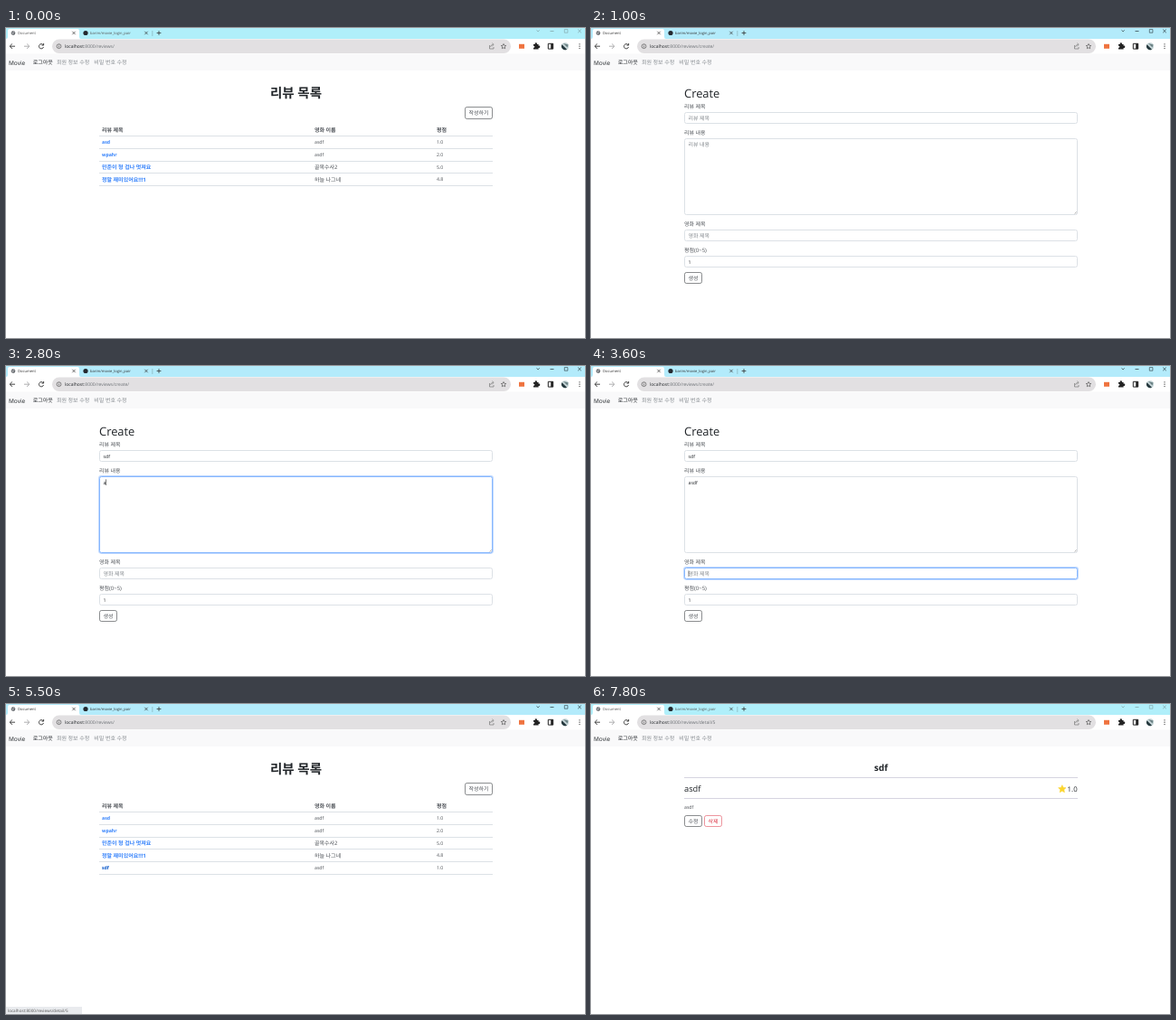
These frames come from a looping animation (640 px wide and 343 px high, 8200 ms). An HTML page:

```html
<!DOCTYPE html>
<html lang="ko">
<head>
<meta charset="utf-8">
<title>Movie reviews</title>
<style>
  html, body { margin: 0; height: 100%; overflow: hidden; background: #fff; }
  svg { display: block; width: 100vw; height: 100vh; }
  text {
    font-family: "Open Sans", "Noto Sans CJK KR", "Noto Sans CJK", sans-serif;
    text-rendering: geometricPrecision;
    white-space: pre;
  }
</style>
</head>
<body>
<svg id="stage" viewBox="0 0 640 343"></svg>
<script>
const LOOP = 8200, STEP = 100;
const INK = '#212529', SOFT = '#4c5056', MUTED = '#858a8f', LINE = '#dce1e6', BLUE = '#0d6efd', RED = '#dc3545';
const stage = document.getElementById('stage');

// Drawing helpers: each returns SVG markup. Text is placed by its vertical centre.
const text = (x, cy, str, { fill = INK, size = /[ㄱ-힣]/.test(str) ? 6 : 5.2, bold, anchor = 'start' } = {}) =>
  `<text x="${x}" y="${cy + size * .36}" font-size="${size}" fill="${fill}" text-anchor="${anchor}"` +
  `${bold ? ' font-weight="700"' : ''}>${str}</text>`;
const rect = (x, y, w, h, fill, attrs = '') =>
  `<rect x="${x}" y="${y}" width="${w}" height="${h}" fill="${fill}" ${attrs}/>`;
const path = (d, stroke = '#333', width = .8, fill = 'none') =>
  `<path d="${d}" stroke="${stroke}" stroke-width="${width}" fill="${fill}"/>`;
const circle = (x, y, r, fill, attrs = '') => `<circle cx="${x}" cy="${y}" r="${r}" fill="${fill}" ${attrs}/>`;
const cross = (x, y, r, color) => path(`M${x - r} ${y - r}l${2 * r} ${2 * r}m0 ${-2 * r}l${-2 * r} ${2 * r}`, color, .7);
const rule = (y, color = LINE) => rect(103, Math.round(y), 435, 1, color);
const star = (x, y, r) => 'M' + Array.from({ length: 10 }, (_, i) => {
  const a = i * Math.PI / 5, d = i % 2 ? r * .48 : r;
  return `${(x + d * Math.sin(a)).toFixed(2)} ${(y - d * Math.cos(a)).toFixed(2)}`;
}).join('L') + 'Z';

const clamp = v => Math.max(0, Math.min(1, v));
const fade = (t, start) => clamp((t - start) / 150);
// Visible from start to end, easing in and out over 150 ms.
const span = (t, start, end) => fade(t, start) - fade(t, end);
// Value of the last [time, value] pair that has been reached.
const at = (t, keys) => keys.reduce((value, [time, v]) => t >= time ? v : value, '');

function button(x, y, w, h, label, hover = 0, color = INK) {
  return rect(x, y, w, h, color, `fill-opacity="${hover}" stroke="${color}" stroke-opacity=".75" stroke-width=".7" rx="2"`) +
    text(x + w / 2, y + h / 2, label, { fill: hover > .5 ? '#fff' : color === INK ? SOFT : color, anchor: 'middle' });
}

function field(y, h, label, value, placeholder, focus = 0, caretX = 0) {
  const cy = y + 6.2;
  return text(103, y - 7, label, { fill: SOFT }) +
    rect(102.8, y - .7, 435.4, h + 1.4, 'none', `rx="2.6" stroke="${BLUE}" stroke-width="1.4" opacity="${focus * .28}"`) +
    rect(103.5, y, 434, h, '#fff', `rx="2" stroke="${focus > .5 ? '#86b7fe' : LINE}"`) +
    text(107.5, cy, value || placeholder, { fill: value ? INK : MUTED }) +
    (caretX ? rect(caretX, cy - 3.3, .6, 6.6, '#222') : '');
}

function chrome(t, url) {
  const active = t >= 900 && t < 7800;
  const ink = active ? '#26343a' : '#7d9ea3';
  const tabText = active ? '#333' : '#555';
  return rect(0, 0, 640, 12, active ? '#b3ebfb' : '#b0effa') +
    path('M0 12Q2 12 2 10V3Q2 1 4 1H79Q81 1 81 3V10Q81 12 83 12Z', 'none', 0, '#fff') +
    circle(8, 5.6, 2.3, '#5f6368') + path('M6.4 5l1.7 .6-.5 1.6M8 3.8l1.6 1.2', '#fff', .6) +
    text(13, 5.5, 'Document', { size: 4.1, fill: tabText }) + cross(75, 5.5, 1.7, '#333') +
    circle(88, 5.5, 2.6, '#24292f') +
    text(93, 5.4, 'barim/movie_login_pair', { size: 4.1, fill: tabText }) + cross(155, 5.5, 1.7, '#333') +
    rect(161.6, 3, .6, 6, '#7fa5ad') + path('M166.6 5.5h4.8M169 3.1v4.8', '#333') +
    path('M586.5 2.4l1.6 1.5 1.6-1.5', ink, .7) +
    path('M601.5 3.5h4', ink, .7) + path('M617.3 1.6h3.6v3.6h-3.6z', ink, .6) + cross(634, 3.4, 1.8, ink) +
    // Toolbar
    rect(0, 12, 640, 16.5, '#fff') +
    path('M10 20.2H4.2M6.9 17.5l-2.7 2.7 2.7 2.7', '#333', .9) +
    path('M20 20.2h5.8M23.1 17.5l2.7 2.7-2.7 2.7', '#a5a5a8', .9) +
    path('M41 18.6A2.6 2.6 0 1 0 41.5 21M41.6 17v2.1h-2.1', '#333', .9) +
    rect(51, 12.5, 507, 15.5, '#e2e0e2', 'rx="7.7"') +
    circle(58.5, 20.2, 2.4, 'none', 'stroke="#555" stroke-width=".7"') + path('M58.5 19.8v1.7M58.5 18.7v.6', '#555', .7) +
    text(65, 20.1, `localhost<tspan fill="#6c7075">:8000/reviews/${url}</tspan>`, { size: 5 }) +
    path('M534.5 19v4h4.5v-2M535.5 21q.3-2.6 3-2.6M537.4 16.8l1.8 1.6-1.8 1.6', '#777', .7) +
    path(star(550, 20.4, 2.9), '#555', .7) +
    rect(567, 17.8, 6, 5, '#ef7440') +
    path('M583 18h1.7a1.2 1.2 0 1 1 2.2 0h1.7v1.7a1.2 1.2 0 1 1 0 2.2v1.7h-5.6v-1.9a1 1 0 1 0 0-1.9z', 'none', 0, '#222') +
    path('M599.3 17.3h5.4v5.8h-5.4z', '#222', 1) + rect(602.2, 17.3, 2.5, 5.8, '#222') +
    circle(618, 20.2, 4, '#c4d4d6') + path('M614.5 18.3L620 23.7A4 4 0 0 1 614.5 18.3', 'none', 0, '#25383d') +
    path('M616 17l4.5 4.5 1-3z', 'none', 0, '#6c8285') +
    [17.8, 20.2, 22.6].map(y => circle(634, y, .65, '#333')).join('') +
    // Site navigation
    rect(0, 28.5, 640, 18.5, '#f9f9fa') +
    text(3, 38.3, 'Movie', { size: 6.5 }) + text(29.7, 38, '로그아웃') +
    text(56, 38, '회원 정보 수정', { fill: MUTED }) + text(97.3, 38, '비밀 번호 수정', { fill: MUTED });
}

function listPage(t) {
  const rows = [
    ['asd', 'asdf', '1.0'],
    ['wpahr', 'asdf', '2.0'],
    ['민준이 형 겁나 멋져요', '골목수사2', '5.0'],
    ['정말 재미있어요!!!1', '하늘 나그네', '4.8'],
  ];
  if (t >= 4400) rows.push(['sdf', 'asdf', '1.0']);
  const hovered = t >= 5500;
  const cells = (cy, [title, movie, score], fill, bold) =>
    text(106, cy, title, { fill, bold: true }) + text(341, cy, movie, { fill: SOFT, bold }) +
    text(476, cy, score, { fill: SOFT, bold });
  return text(320.5, 71.7, '리뷰 목록', { size: 14.5, bold: true, anchor: 'middle' }) +
    button(507.5, 87.5, 30, 13, '작성하기', span(t, 550, 900)) +
    cells(112.4, ['리뷰 제목', '영화 이름', '평점'], SOFT, true) + rule(119) +
    rows.map((row, i) => cells(126.3 + i * 13.75, row, hovered && i === 4 ? '#0a58ca' : '#2f7ffb') +
      rule(132.75 + i * 13.75)).join('') +
    (hovered ? rect(0, 335, 84, 8, '#e9ebee') +
      text(2, 339.2, 'localhost:8000/reviews/detail/5', { size: 4.6, fill: '#555' }) : '');
}

function createPage(t) {
  const title = at(t, [[2300, 's'], [2400, 'sdf']]);
  const body = at(t, [[2800, 'a'], [2900, 'asd'], [3000, 'asdf']]);
  const movie = at(t, [[3700, 'a'], [3800, 'as'], [3900, 'asd'], [4000, 'asdf']]);
  const caret = (value, from, to) => t >= from && t < to ? 107.7 + value.length * 2.6 : 0;
  return text(103, 72.8, 'Create', { size: 12.9 }) +
    field(93.5, 12, '리뷰 제목', title, '리뷰 제목', span(t, 1850, 2550), caret(title, 2100, 2600)) +
    field(122.5, 84, '리뷰 내용', body, '리뷰 내용', span(t, 2550, 3450), caret(body, 2700, 3500)) +
    path('M534.5 205.5l2.2-2.2M536 205.5l.8-.8', '#777', .5) +
    field(223.5, 12, '영화 제목', movie, '영화 제목', span(t, 3450, 4400), caret(movie, 3600, 4200)) +
    field(252.5, 12, '평점(0~5)', '1', '') +
    button(103.5, 270.5, 19, 12, '생성', fade(t, 4150));
}

function detailPage(t) {
  return text(320.5, 70.5, 'sdf', { size: 9.9, bold: true, anchor: 'middle' }) + rule(81, '#d6d4e0') +
    text(103, 93.7, 'asdf', { size: 9.3 }) +
    path(star(520.8, 94.1, 4.4), '#fbd52f', .6, '#fbd52f') +
    text(537.6, 93.9, '1.0', { size: 7.8, anchor: 'end' }) + rule(104, '#d6d4e0') +
    text(103, 114, 'asdf', { fill: SOFT }) +
    button(103.5, 123.5, 19, 12, '수정', span(t, 6000, 6100)) +
    button(125.5, 123.5, 19, 12, '삭제', span(t, 6050, 6150), RED);
}

function render(t) {
  const [page, url] = at(t, [
    [0, [listPage, '']], [900, [createPage, 'create/']],
    [4400, [listPage, '']], [5700, [detailPage, 'detail/5']],
  ]);
  stage.innerHTML = rect(0, 0, 640, 343, '#fff') + chrome(t, url) + page(t);
}

let shown = -1;
function tick() {
  const t = Math.floor(performance.now() % LOOP / STEP) * STEP;
  if (t !== shown) render(shown = t);
  requestAnimationFrame(tick);
}
tick();
</script>
</body>
</html>
```
